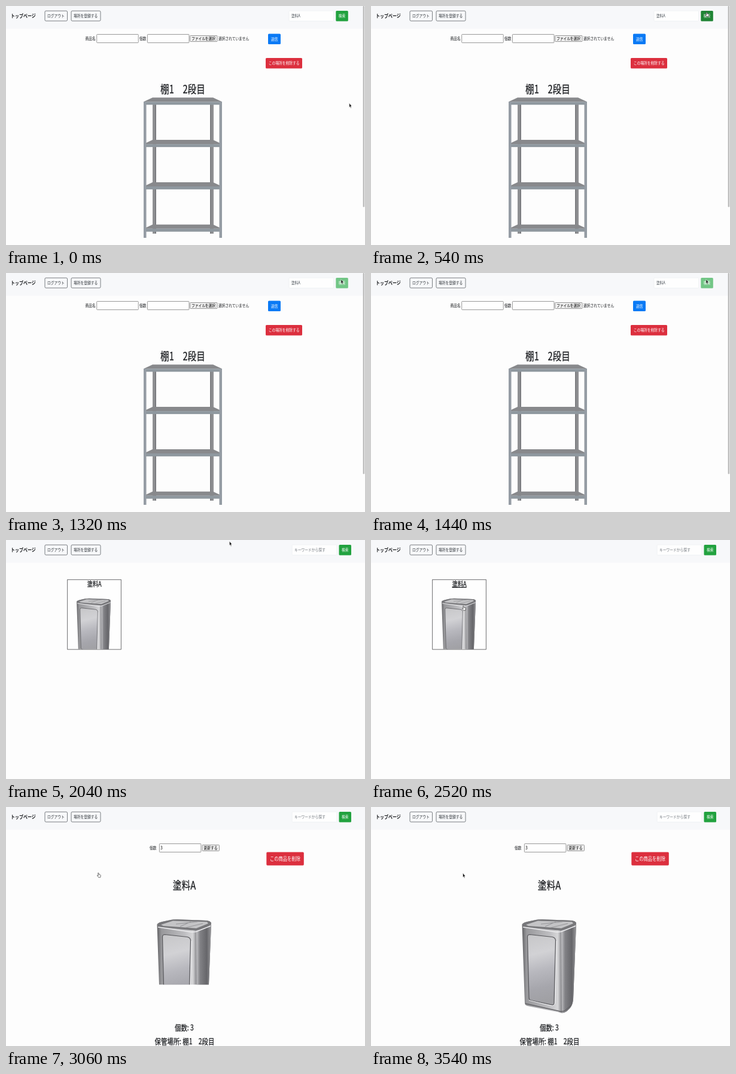
These frames come from a looping animation (600 by 400 pixels, 3.6 s). An HTML page:

```html
<!DOCTYPE html>
<html lang="ja">
<head>
<meta charset="utf-8">
<style>
  html, body { margin: 0; width: 100%; height: 100%; overflow: hidden; background: #fdfdfd; }
  svg { display: block; width: 100vw; height: 100vh; }
  text { font-family: "Noto Sans CJK JP", "Noto Sans CJK", sans-serif; white-space: pre; }
  .head { stroke: #1b1d20; stroke-width: .25; }
</style>
</head>
<body>
<svg id="stage" viewBox="0 0 600 400"></svg>
<script>
const LOOP = 3600, STEP = 60, SQUEEZE = 0.8;
const INK = '#1b1d20', MUTED = '#757b80', PAGE = '#fdfdfd';
const GREEN = '#22a23f', GREEN_HOVER = '#1f8435', GREEN_OFF = '#72c686', RED = '#dc2f3e';
const stage = document.getElementById('stage');

const text = (x, y, size, str, fill = INK, attrs = '') =>
  `<text transform="translate(${x} ${y}) scale(${SQUEEZE} 1)" font-size="${size}" fill="${fill}" ${attrs}>${str}</text>`;
const head = (x, y, size, str, attrs = '') => text(x, y, size, str, INK, 'class="head" ' + attrs);
const rect = (x, y, w, h, fill, stroke = 'none', r = 0, attrs = '') =>
  `<rect x="${x}" y="${y}" width="${w}" height="${h}" rx="${r}" fill="${fill}" stroke="${stroke}" stroke-width=".8" ${attrs}/>`;
const poly = (points, fill) => `<polygon points="${points}" fill="${fill}"/>`;
const path = (d, fill, attrs = '') => `<path d="${d}" fill="${fill}" ${attrs}/>`;
const button = (x, y, w, h, fill, tx, ty, size, label, id = '') =>
  rect(x, y, w, h, fill, 'none', 1.6, id && `id="${id}"`) + text(tx, ty, size, label, '#fff');
const outline = (x, w, tx, label) =>
  rect(x, 8.2, w, 16.8, 'none', '#5a5f64', 1.8) + text(tx, 19.3, 7.2, label, '#33383d');
const field = (x, y) => rect(x, y, 69.5, 14, '#fefefe', '#808080', 0.8);
const grayButton = (x, y, w, tx, label) =>
  rect(x, y, w, 10, '#efefef', '#808080', 1) + text(tx, y + 7.7, 7.15, label, '#000');

function search(x, value, color, id) {
  return rect(x, 8, 75, 17.3, '#fefefe', '#eceff1', 1.6) +
    text(x + 4, 19.3, 7.2, value, color) +
    button(x + 78.5, 8, 20.5, 17.6, GREEN, x + 83, 19.4, 7.2, '検索', id);
}

function shelf() {
  const front = '#959ca4', back = '#8f9093', edge = '#7c7d81';
  let out = rect(245, 162, 6, 219, back) + rect(341, 162, 6, 219, back) +
    rect(249, 162, 2, 219, edge) + rect(341, 162, 2, 219, edge);
  for (let i = 0; i < 4; i++) {
    const y = 153.3 + i * 70.8;
    out += poly(`245,${y} 346,${y} 361,${y + 7} 230,${y + 7}`, '#88898c') +
      rect(230, y + 7, 131, 5, '#8f989f');
  }
  return out + rect(230, 160, 4.5, 228, front) + rect(356.5, 160, 4.5, 228, front);
}

const can = () =>
  path('M252.5 197Q253 194 261 192L275 189Q279 188 286 188L335 190Q343 191 343 195L338 322Q337 331 333 336L327 342Q322 346 315 344L262 333Q257 332 257 328Z', 'url(#body)') +
  path('M318 207L343 195L338 322Q337 331 333 336L327 342L319 344Z', 'url(#side)') +
  path('M252.5 197Q253 194 261 192L275 189Q279 188 286 188L335 190Q343 191 343 195Q342 198 334 201L323 205Q317 207 308 206L262 201Q253 200 252.5 197Z', '#77777a') +
  path('M259 197L279 190.5L336 192.3L338 195L318 203L263 199Z', '#c4c4c6') +
  path('M284 196L320 191.8M291 200L309 192M300 202L329 195', 'none', 'stroke="#98989b" stroke-width="1.2"') +
  path('M254 201L308 209Q316 210 322 207L342 199', 'none', 'stroke="#ececee" stroke-width="1.5"') +
  path('M265.5 213.5L303 217.5Q308 218.5 308.5 223L306 328Q306 332 302 331L267 323.5Q264 322.5 264 319L261.5 217.5Q261.5 213.5 265.5 213.5Z', 'url(#panel)', 'stroke="#56565a" stroke-width="1.2"') +
  path('M264 323.5L301 332.5Q307 333 307.5 328L310 224', 'none', 'stroke="#f0f0f2" stroke-width="1"') +
  path('M258 329L316 342Q321 343 325 340L334 332', 'none', 'stroke="#636366" stroke-width="1.3"');

const gradient = (id, dir, stops) => `<linearGradient id="${id}" ${dir}>` +
  stops.map(([at, c]) => `<stop offset="${at}" stop-color="${c}"/>`).join('') + '</linearGradient>';

stage.innerHTML = '<defs>' +
  gradient('body', '', [[0, '#626265'], [.08, '#98989b'], [.5, '#bdbdc0'], [.66, '#d6d6d8'], [.74, '#7c7c80'], [1, '#68686b']]) +
  gradient('side', '', [[0, '#c4c4c7'], [.25, '#828286'], [.7, '#66666a'], [1, '#98989b']]) +
  gradient('panel', 'x2=".1" y2="1"', [[0, '#c6c6c8'], [.3, '#d2d2d5'], [.55, '#b8b8be'], [.8, '#a6a6ac'], [1, '#a0a0a4']]) +
  `<clipPath id="frame">${rect(103, 66.5, 89, 116.3, '#fff')}</clipPath>
   <clipPath id="loaded"><rect id="reveal" x="240" y="186" width="120" height="0"/></clipPath></defs>` +
  rect(0, 0, 600, 400, PAGE) + rect(0, 0, 600, 38, '#f7f8fa') +
  text(8, 19.8, 8.75, 'トップページ', INK, 'font-weight="700"') +
  outline(65, 37.5, 69, 'ログアウト') + outline(109, 49, 113, '場所を登録する') +

  '<g id="page0">' + search(472.8, '塗料A', '#495057', 'find0') +
  text(132.5, 57.2, 7.15, '商品名') + field(151.7, 47.5) +
  text(223, 57.2, 7.15, '個数') + field(236.4, 47.5) +
  grayButton(307.5, 49.5, 45.5, 310, 'ファイルを選択') + text(355, 57.2, 7.15, '選択されていません') +
  button(438, 46.5, 21, 17.6, '#0a7af5', 442.7, 58, 7.2, '送信') +
  button(434, 87, 61, 17.5, RED, 438.7, 98.4, 7.2, 'この場所を削除する') +
  head(258, 145.6, 18.3, '棚1　2段目') + shelf() +
  rect(596.6, 0, 2.6, 336.5, '#bdbdbd', 'none', 1.3) + '</g>' +

  '<g id="page1">' + search(478, 'キーワードから探す', MUTED, 'find1') +
  rect(102.7, 66.3, 89.6, 116.8, '#fefefe', '#4a4a4d') +
  head(135.7, 77.6, 11.5, '塗料A', 'id="name"') +
  `<g clip-path="url(#frame)"><g transform="translate(119 98) scale(.63) translate(-254 -188.5)">${can()}</g></g></g>` +

  '<g id="page2">' + search(478, 'キーワードから探す', MUTED, 'find2') +
  text(240, 71.2, 7.15, '個数') + field(256.4, 61.5) + text(258.2, 71.4, 7.8, '3', '#000') +
  grayButton(328, 63.5, 28.5, 330.6, '更新する') +
  button(435.3, 75.5, 62.5, 22.2, RED, 441, 90, 9.1, 'この商品を削除') +
  head(278.7, 138.4, 18.5, '塗料A') + `<g clip-path="url(#loaded)">${can()}</g>` +
  head(282, 374.4, 13, '個数: 3') + head(248.5, 397.2, 13, '保管場所: 棚1　2段目') + '</g>' +

  '<g id="cursor">' +
  path('M0 0L0 7.2L1.4 5.8L2.4 8.4L3.4 7.9L2.5 5.4L4.2 5.2Z', '#161616', 'id="arrow" stroke="#fff" stroke-width=".5"') +
  path('M.2 0Q1-.8 1.5.3L2.2 2.6L4 3L4.8 4.2L4.2 7.3L1.2 7.3L-1 4.4Q-1.2 3.4 0 3.8L.8 4.3Z', '#fff', 'id="hand" stroke="#222" stroke-width=".65"') +
  '</g>';

const el = id => document.getElementById(id);
const clamp = v => Math.max(0, Math.min(1, v));
const mix = (a, b, u) => a + (b - a) * u;
const show = (id, on) => el(id).setAttribute('display', on ? 'inline' : 'none');

function pointer(t) {
  if (t < 1860) {
    const u = clamp(t / 540), e = u * u * (3 - 2 * u);
    return [mix(573.7, 560, e), mix(162.5, 10.5, e)];
  }
  const p = 1 - (1 - clamp((t - 1860) / 540)) ** 1.515, top = 0.459;
  const y = p < top ? mix(10.5, 2, p / top) : mix(2, 110.5, ((p - top) / (1 - top)) ** 1.5);
  return [mix(560, 153.5, p), y];
}

function draw(ms) {
  const t = Math.floor((ms % LOOP) / STEP) * STEP;
  const page = t < 1500 ? 0 : t < 2880 ? 1 : 2;
  const [x, y] = pointer(t);
  const sent = t >= 1320 && page === 0;
  const onFind = page < 2 && !sent && y < 25 && x > (page ? 556 : 551);
  const onCard = page === 1 && x > 103 && x < 192 && y > 66;
  const hand = onFind || onCard || (page === 2 && t < 3240);

  for (let i = 0; i < 3; i++) show('page' + i, i === page);
  el('find0').setAttribute('fill', sent ? GREEN_OFF : onFind ? GREEN_HOVER : GREEN);
  el('find1').setAttribute('fill', onFind ? GREEN_HOVER : GREEN);
  el('name').setAttribute('text-decoration', onCard ? 'underline' : 'none');
  el('reveal').setAttribute('height', t < 2940 ? 0 : mix(10, 162, clamp((t - 2940) / 180)));
  el('cursor').setAttribute('transform', `translate(${x} ${y})`);
  show('hand', hand);
  show('arrow', !hand);
}

const start = performance.now();
function tick() {
  draw(performance.now() - start);
  requestAnimationFrame(tick);
}
tick();
</script>
</body>
</html>
```
